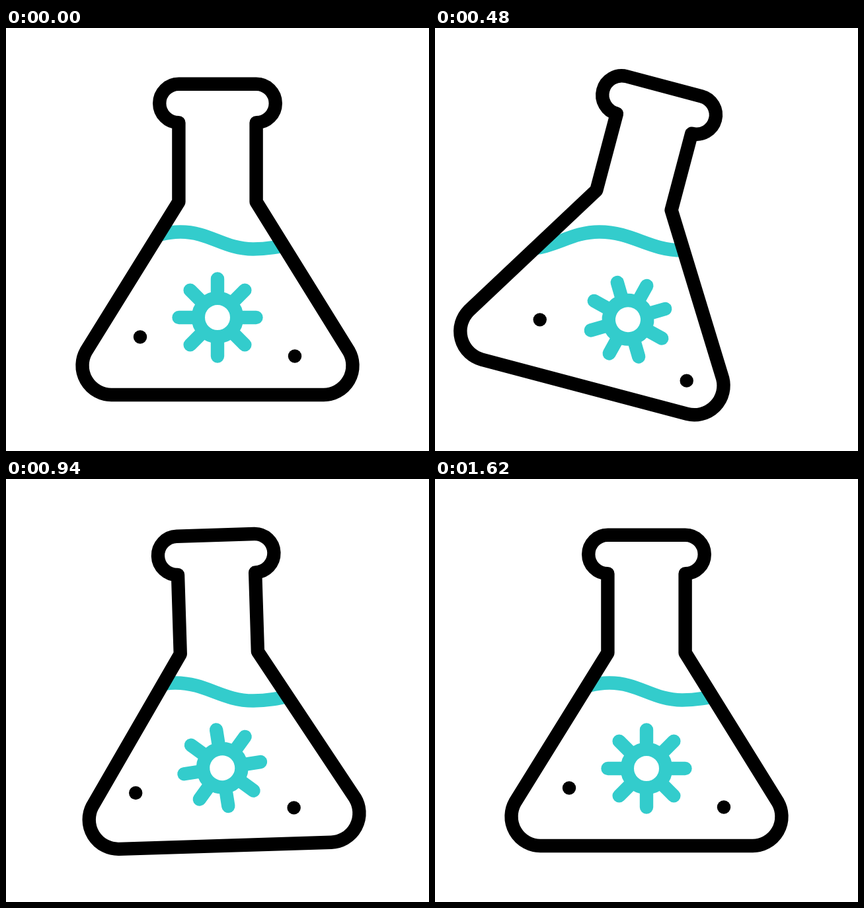
Recreate the animation shown at these times as an HTML page with a canvas. Size 640x640 px, loop 1.7 s.

```html
<!DOCTYPE html>
<html lang="en">
<head>
<meta charset="utf-8">
<title>Swinging flask</title>
<style>
  html, body { margin: 0; width: 100%; height: 100%; overflow: hidden; background: #fff; }
  canvas { display: block; }
</style>
</head>
<body>
<canvas width="640" height="640"></canvas>
<script>
const ctx = document.querySelector('canvas').getContext('2d');
const LOOP = 1700, END = 1620, STEP = 20;
const TEAL = '#3cc', LINE = 20.4, PIVOT_Y = 188.5, RING = 29.2, SPOKE = 58.5;

// Times at which each kind of motion turns around.
const SWING = [463, 813, 1078, 1370], DRIFT = [463, 744, 1060, 1340], SLOSH = [463, 640, 940, 1200];

const flask = new Path2D(`M261.4 143.2 A29.2 29.2 0 0 1 261.4 84.8 H378.6
  A29.2 29.2 0 0 1 378.6 143.2 V263 L518.8 489 A44.3 44.3 0 0 1 480.7 555
  H159.3 A44.3 44.3 0 0 1 121.2 489 L261.4 263 Z`);

// Eases from rest through the peaks and back to rest.
function sway(t, beats, peaks) {
  const times = [0, ...beats, END], values = [0, ...peaks, 0];
  const i = Math.max(1, times.findIndex(time => time >= t));
  const u = (t - times[i - 1]) / (times[i] - times[i - 1]);
  return values[i - 1] + (values[i] - values[i - 1]) * u * u * (3 - 2 * u);
}

const rad = deg => deg * Math.PI / 180;

function tiltStage(deg) {
  ctx.translate(320, PIVOT_Y);
  ctx.rotate(rad(deg));
  ctx.translate(-320, -PIVOT_Y);
}

function drawWave(slosh, lift) {
  const crestX = 264 + 20 * slosh, troughX = 374, troughY = 334.5 - 2.5 * slosh;
  const points = [[crestX - 112, 334 + 9 * lift], [crestX, 308.5 + 5 * lift],
                  [troughX, troughY], [troughX + 112, troughY - 15]];
  ctx.beginPath();
  ctx.moveTo(...points[0]);
  for (let i = 1; i < points.length; i++) {
    const [x0, y0] = points[i - 1], [x, y] = points[i], h = (x - x0) * 0.4;
    ctx.bezierCurveTo(x0 + h, y0, x - h, y, x, y);
  }
  ctx.stroke();
}

// The gear turns as it rolls sideways.
function drawGear(shift) {
  ctx.save();
  ctx.translate(320 + shift, 438 - 0.115 * shift);
  ctx.rotate(rad(-7.46 * shift));
  ctx.beginPath();
  ctx.arc(0, 0, RING, 0, 2 * Math.PI);
  for (let i = 0; i < 8; i++) {
    ctx.moveTo(0, -RING);
    ctx.lineTo(0, -SPOKE);
    ctx.rotate(Math.PI / 4);
  }
  ctx.stroke();
  ctx.restore();
}

function drawDot(x, y) {
  ctx.beginPath();
  ctx.arc(x, y, LINE / 2, 0, 2 * Math.PI);
  ctx.fill();
}

function draw(now) {
  const t = Math.min(END, Math.floor(now % LOOP / STEP) * STEP);
  const angle = sway(t, SWING, [15, -7, 4.1, -2.2]);
  const slosh = sway(t, SLOSH, [-0.8, 0.9, -0.4, 1]);
  const lift = Math.max(0, slosh);
  const sink = Math.sin(Math.PI * Math.max(0, (t - 640) / (END - 640)));
  const left = sway(t, DRIFT, [-45, 23, -21, 17]);
  const right = sway(t, DRIFT, [-57, 12.5, -8, 22]);

  ctx.fillStyle = '#fff';
  ctx.fillRect(0, 0, 640, 640);
  ctx.lineWidth = LINE;
  ctx.lineCap = ctx.lineJoin = 'round';
  ctx.strokeStyle = TEAL;

  ctx.save();
  tiltStage(angle);
  ctx.clip(flask);
  tiltStage(-angle);
  drawWave(slosh, lift);
  ctx.restore();

  drawGear(sway(t, SWING, [-28.3, 14.5, -1, 14]));

  ctx.fillStyle = ctx.strokeStyle = '#000';
  drawDot(203 + left, 467.5 + 0.59 * left + 14 * sink);
  drawDot(437 + right, 496.5 - 0.66 * right + 11 * lift);

  ctx.save();
  tiltStage(angle);
  ctx.stroke(flask);
  ctx.restore();
  requestAnimationFrame(draw);
}
requestAnimationFrame(draw);
</script>
</body>
</html>
```
